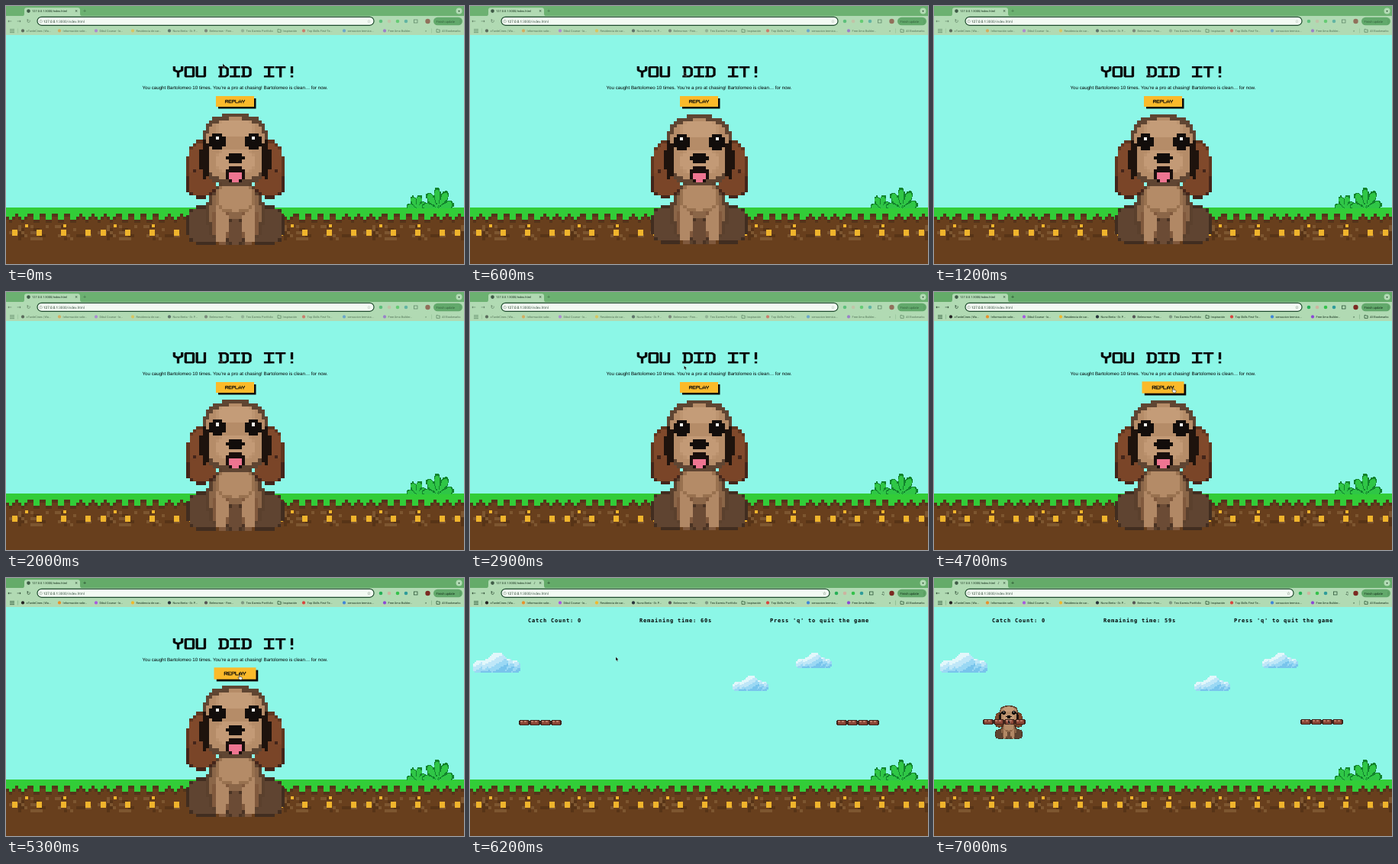
An HTML page for the animation above (7.1 s loop, 600 by 338 pixels).

```html
<!DOCTYPE html>
<html lang="en">
<head>
<meta charset="utf-8">
<title>Catch the dog</title>
<style>
  html, body { margin: 0; width: 100%; height: 100%; overflow: hidden; background: #8cf7e7; }
  svg { display: block; width: 100vw; height: 100vh; }
  text { white-space: pre; text-rendering: geometricPrecision; }
  .art { shape-rendering: crispEdges; }
  .ui { font-family: Roboto, sans-serif; fill: #16301d; }
  .sym { font-family: "DejaVu Sans", sans-serif; text-anchor: middle; }
  .hud { font: bold 7px "DejaVu Sans Mono", monospace; letter-spacing: .79px; }
  .note { font: 6.2px "Liberation Sans", Arial, sans-serif; text-anchor: middle; }
  .pen { fill: none; stroke: #0a0a0a; stroke-width: 1.3; stroke-linecap: square; stroke-linejoin: bevel; }
</style>
</head>
<body>
<svg id="stage" viewBox="0 0 600 338"></svg>
<script>
const LOOP = 7100, STEP = 100;
const FOCUS_AT = 4600, GAME_AT = 5500, TICK_AT = 6600;

// ---------- helpers ----------
const box = (x, y, w, h) => `M${x} ${y}h${w}v${h}h${-w}z`;
const path = (fill, d) => `<path fill="${fill}" d="${d}"/>`;
const rect = (x, y, w, h, fill, extra = '') =>
  `<rect x="${x}" y="${y}" width="${w}" height="${h}" fill="${fill}" ${extra}/>`;
const dot = (x, y, r, fill) => `<circle cx="${x}" cy="${y}" r="${r}" fill="${fill}"/>`;
const text = (x, y, size, s) => `<text x="${x}" y="${y}" font-size="${size}">${s}</text>`;
const sym = (x, y, size, s) => `<text class="sym" x="${x}" y="${y}" font-size="${size}">${s}</text>`;
const repeat = (n, fn) => Array.from({ length: n }, (_, i) => fn(i)).join('');

// Unit cells coloured by a rule, one path per colour.
function cells(w, h, colour) {
  const layers = {};
  for (let y = 0; y < h; y++) for (let x = 0; x < w; x++) {
    const c = colour(x + .5, y + .5);
    if (c) layers[c] = (layers[c] || '') + box(x, y, 1, 1);
  }
  return Object.entries(layers).map(([c, d]) => path(c, d)).join('');
}

// ---------- block lettering: pen strokes on a 4 x 6 grid ----------
const STROKES = {
  Y: 'M0 0V2L2 3L4 2V0M2 3V6', O: 'M0 0H4V6H0z', U: 'M0 0V6H4V0',
  D: 'M0 0H3L4 1V5L3 6H0M.6 0V6', I: 'M0 0H4M2 0V6M0 6H4', T: 'M0 0H4M2 0V6',
  R: 'M0 6V0H4V3H0M2 3L4 6', E: 'M4 0H0V6H4M0 3H3', P: 'M0 6V0H4V3H0',
  L: 'M0 0V6H4', A: 'M0 6V2L2 0L4 2V6M0 4H4', '!': 'M2 0V3.4M2 6V6'
};
function lettering(s, cx, y, pitch, height) {
  const sx = pitch / 5.8, sy = height / 7.3;
  const marks = [...s].map((c, i) =>
    `<path class="pen" d="${STROKES[c] || ''}" transform="translate(${i * 5.8 + .9} .65)"/>`);
  return `<g role="img" aria-label="${s}" transform="translate(${cx - s.length * pitch / 2} ${y}) scale(${sx} ${sy})">${marks.join('')}</g>`;
}

// ---------- dog: mirrored rounded parts on a 30 x 40 grid ----------
// offset from the axis, y, half width, half height, fill, rim
const dogParts = [
  [9.4, 34, 5.6, 6, '#5f4431', '#412d20'],
  [0, 30.5, 8.8, 9.8, '#8b6648', '#5a402d'],
  [0, 36, 3, 4.2, '#6b4b35', '#4a3324'],
  [4.4, 33.5, 2.3, 6.4, '#b18865', '#80593d'],
  [0, 25.5, 6, 4.6, '#b48b67', '#98714f'],
  [11, 17, 3.8, 8.6, '#80492b', '#60361f'],
  [10.3, 21.2, 4.6, 4.4, '#7a4528', '#43251a'],
  [0, 11, 10.5, 11, '#b58c68', '#5f4532'],
  [9.4, 14, 1.2, 6.5, '#1e130d', '#1e130d'],
  [1, 4.5, 5, 2.8, '#c49c78', '#bd9571'],
  [0, 14.5, 6.5, 4, '#c39a76', '#bb926e'],
  [5.3, 8.5, 2.6, 2.3, '#120d0b', '#120d0b'],
  [5.5, 7.5, .6, .6, '#f5f3ee', '#f5f3ee'],
  [0, 13.5, 2.6, 1.7, '#120d0b', '#120d0b'],
  [0, 18.4, 3, 2.3, '#1a0f0d', '#1a0f0d'],
  [0, 19.2, 2, 1.5, '#ee7591', '#ee7591']
];
const dog = cells(30, 40, (x, y) => {
  let colour;
  for (const [u, v, ru, rv, fill, rim] of dogParts) {
    const d = Math.abs((Math.abs(x - 15) - u) / ru) ** 2.5 + Math.abs((y - v) / rv) ** 2.5;
    if (d < 1) colour = d > .72 ? rim : fill;
  }
  return colour;
});

// ---------- scenery ----------
const puffs = [[5, 9.5, 5], [10.5, 8.5, 4.5], [26.5, 9.5, 4.5], [22, 8.5, 4.8], [16, 6.8, 6.8]];
const cloud = cells(31, 13, (x, y) => {
  const p = puffs.filter(([a, b, r]) => Math.hypot(x - a, y - b) < r).pop();
  if (!p) return;
  const lit = (y - p[1] + (x - p[0]) * .6) / p[2];
  return lit < -.55 ? '#e2f7fb' : lit < .05 ? '#bfe7f8' : lit < .6 ? '#9ad8f4' : '#78c4ec';
});

// A fan of pointed leaves.
const bush = (w, h, leaves) => cells(w, h, (x, y) => {
  const dx = (x - w / 2) / (w / 2), up = (h - y) / h;
  const lobe = Math.abs(Math.sin(Math.atan2(up, dx) * leaves / 2 + .5));
  const left = .7 + .32 * lobe - Math.hypot(dx, up);
  if (left > 0) return left < .1 || lobe < .35 ? '#12832c' : '#2fc646';
});

// One tile of grass and earth.
function soil() {
  let seed = 11;
  const rnd = n => (seed = seed * 16807 % 2147483647) % n;
  const patches = (n, fill) =>
    repeat(n, () => rect(rnd(27) * 4, 23 + rnd(5) * 4, 4 + rnd(2) * 4, 4, fill));
  const depth = i => 12 + 4 * Math.round(1.2 * Math.sin(i * 14 * Math.PI / 29));
  return rect(0, 0, 116, 74, '#683f1d') + patches(22, '#7d5630') + patches(12, '#573417') +
    repeat(29, i => rect(i * 4, 0, 4, depth(i) + 4, '#54341a') + rect(i * 4, 0, 4, depth(i), '#32cd38')) +
    repeat(4, i => rect(8 + i * 32, 29, 7, 8, '#f0b42c')) +
    repeat(2, i => rect(25 + i * 50, 22, 4, 4, '#f0b42c'));
}

const platform = repeat(4, i => `<g transform="translate(${i * 14})">` + cells(14, 7, (x, y) => {
  const d = Math.abs((x - 7) / 7) ** 4 + Math.abs((y - 3.5) / 3.5) ** 4;
  if (d < 1) return d > .35 ? '#3f231b' : y < 3 && x % 5 > 2 ? '#bd7d68' : '#8b4636';
}) + '</g>');

// ---------- browser ----------
const bookmarks = [
  ['#222', 'oTardeCines | Wa...'], ['#e8912c', 'Información sobr...'],
  ['#a55be0', 'Dibul Course - lo...'], ['#f0b92c', 'Residencia de car...'],
  ['#26323a', 'Nuno Berta - Sr. P...'], ['#555', 'Belmorrow - Finn...'],
  ['#7d9a82', 'Teo Garmiu Portfolio'], ['', 'Inspiración'],
  ['#d8443e', 'Top Skills First-Te...'], ['#3e86d8', 'sensacion termica...'],
  ['#8a49d6', 'Free Umo Builder...']
];
const folder = x => `<path fill="none" stroke="#1c4428" stroke-width=".7" d="M${x - 2} 30.4h1.6l.6.7h2v3.2h-4.2z"/>`;
const marks = bookmarks.map(([c, s], i) => {
  const x = i < 8 ? 22 + 48 * i : 390 + 53 * (i - 8);
  return (c ? dot(x, 32.4, 2.1, c) : folder(x)) + text(x + 4.6, 33.8, 3.8, s);
}).join('');
const extensions = ['#27b057', '#cdb4a0', '#35c24b', '#2f9c9a'];

const browser = `
  ${rect(0, 0, 600, 14, '#67ad6c', 'id="strip"')}
  ${rect(0, 13, 600, 25, '#b1dab3')}
  <path fill="#b1dab3" d="M21 13.2q3 0 3-3v-5q0-3 3-3h67q3 0 3 3v5q0 3 3 3z"/>
  ${dot(593.5, 6.5, 4, '#b1dab3')}
  ${rect(560, 14.7, 38, 10.6, '#62a96b', 'rx="5.3"')}
  ${rect(41, 14.3, 441, 11, '#f3faf3', 'id="omni" rx="5.5" stroke="#1d4a2c" stroke-width="1.2"')}
  <g class="ui">
    ${dot(29.5, 6.6, 2.3, '#3f5a46')}${text(34, 8, 3.95, '127.0.0.1:3000/index.html')}
    ${sym(92, 8.2, 5, '×')}${sym(593.5, 7.6, 4, '▾')}${sym(45.5, 21.3, 4, 'ⓘ')}
    ${text(49, 21.6, 4.6, '127.0.0.1:<tspan fill="#41594a">3000/index.html</tspan>')}
  </g>
  <g id="chrome" class="ui">
    ${sym(103, 8.3, 5.5, '+')}
    ${sym(5, 22, 6.5, '←')}${sym(17, 22, 6.5, '→')}${sym(29.5, 22, 6.5, '↻')}
    <g id="tools">
      ${sym(475.5, 21.8, 5.5, '☆')}
      ${extensions.map((c, i) => dot(491 + 11 * i, 20, 2.3, c)).join('')}
      ${rect(534.5, 18, 4.5, 4, 'none', 'stroke="#1c4428" stroke-width=".7"')}
    </g>
    <g id="audio">${sym(84.5, 8, 4, '♪')}${sym(541, 22, 5.5, '♫')}</g>
    ${dot(552.5, 20, 3.2, '#7c2a22')}
    ${text(563.5, 21.5, 4.1, 'Finish update')}${sym(595, 21.6, 5, '⋮')}
    ${repeat(9, i => rect(5.4 + i % 3 * 2, 30 + Math.floor(i / 3) * 2, 1.2, 1.2, '#1c4428'))}
    ${rect(15, 29.5, .5, 6, '#6fa577')}${marks}
    ${text(549, 34, 4.5, '»')}${rect(557, 29.5, .5, 6, '#6fa577')}
    ${folder(566)}${text(571, 33.8, 3.8, 'All Bookmarks')}
  </g>`;

// ---------- stage ----------
// x, y, cell size, speed in px/s
const skyline = [[4, 97.5, 2, 5.3], [344, 128, 1.5, -3.6], [427, 98, 1.5, 3.8]];
stage.innerHTML = `
  <defs>
    <g id="dogArt">${dog}</g><g id="cloudArt">${cloud}</g><g id="platformArt">${platform}</g>
    <pattern id="soil" y="264" width="116" height="74" patternUnits="userSpaceOnUse">${soil()}</pattern>
  </defs>
  ${rect(0, 38, 600, 226, '#8cf7e7')}
  <g class="art">
    ${rect(0, 264, 600, 74, 'url(#soil)')}
    <g transform="translate(525 247) scale(1.3)">${bush(20, 14, 7)}</g>
    <g transform="translate(545 238) scale(1.3)">${bush(32, 21, 9)}</g>
  </g>
  <g id="win">
    <g id="bigDog" class="art"><use href="#dogArt"/></g>
    ${lettering('YOU DID IT!', 300, 79, 14.9, 14.5)}
    <text class="note" x="300" y="109.2">You caught Bartolomeo 10 times. You’re a pro at chasing! Bartolomeo is clean… for now.</text>
    <g id="button">
      ${rect(278, 121, 49.5, 13.5, '#0a0a0a')}${rect(275, 118, 50, 14, '#fbba2a')}
      ${lettering('REPLAY', 300, 123, 4.4, 4.2)}
    </g>
  </g>
  <g id="game">
    <g class="art">${repeat(skyline.length, () => '<use class="cloud" href="#cloudArt"/>')}</g>
    <text class="hud" x="76" y="58.3">Catch Count: 0</text>
    <text class="hud" id="timer" x="222" y="58.3"></text>
    <text class="hud" x="393" y="58.3">Press 'q' to quit the game</text>
    <g id="smallDog" class="art" transform="translate(80 167) scale(1.2 1.1)"><use href="#dogArt"/></g>
    <g id="platforms" class="art"><use href="#platformArt" x="64"/><use href="#platformArt" x="480"/></g>
  </g>
  ${browser}
  <g id="pointer">
    <path id="arrow" fill="#050505" stroke="#fff" stroke-opacity=".6" stroke-width=".35" d="M0 0v4.800l1.100-1 .8 1.900.9-.4-.8-1.800h1.500z"/>
    <path id="hand" fill="#fff" stroke="#111" stroke-width=".5" d="M-.6.400q.6-.8 1.200 0v2l2.400.6q.7.300.5 1.200l-.5 2h-3l-2-2.600q.2-.8.900-.3l.5.400z"/>
  </g>`;

const $ = id => document.getElementById(id);
const show = (id, on) => { $(id).style.display = on ? '' : 'none'; };
const move = (el, v) => el.setAttribute('transform', v);
const clouds = [...document.querySelectorAll('.cloud')];

// time, x, y of the pointer tip
const track = [
  [0, 284, 75.5], [600, 281, 87], [2500, 281, 87], [2800, 280.5, 96.5], [3400, 280.5, 96.5],
  [4000, 315, 125.5], [4600, 315, 125.5], [5000, 306, 127], [5500, 306, 127],
  [6200, 191, 103.5], [6800, 97, 186], [LOOP, 97, 186]
];
function pointerAt(t) {
  const i = track.findIndex(k => k[0] > t);
  const [t0, x0, y0] = track[i - 1], [t1, x1, y1] = track[i];
  const p = (t - t0) / (t1 - t0), e = p * p * (3 - 2 * p);
  return [x0 + (x1 - x0) * e, y0 + (y1 - y0) * e];
}

function draw(t) {
  const active = t >= FOCUS_AT, game = t >= GAME_AT, hover = active && !game;
  show('win', !game);
  show('game', game);
  show('audio', game);
  show('smallDog', t >= TICK_AT);
  show('arrow', !hover);
  show('hand', hover);

  $('chrome').setAttribute('opacity', active ? 1 : .6);
  $('strip').setAttribute('fill', active ? '#64ab69' : '#6cb171');
  $('omni').setAttribute('width', game ? 430 : 441);
  move($('tools'), `translate(${game ? -11 : 0})`);
  move($('pointer'), `translate(${pointerAt(t)})`);
  move($('button'), `translate(300 125) scale(${hover ? 1.1 : 1}) translate(-300 -125)`);

  const breath = 4.26 * (1 + .009 * Math.cos((t + 100) / 1800 * 2 * Math.PI));
  move($('bigDog'), `translate(300.5 227) scale(${breath}) translate(-15 -20)`);

  const s = (t - 6200) / 1000;
  clouds.forEach((el, i) => {
    const [x, y, size, speed] = skyline[i];
    move(el, `translate(${x + speed * s} ${y}) scale(${size})`);
  });
  move($('platforms'), `translate(0 ${186 - Math.sin(s)})`);
  $('timer').textContent = `Remaining time: ${t < TICK_AT ? 60 : 59}s`;
}

const start = performance.now();
function tick() {
  const t = (performance.now() - start) % LOOP;
  draw(Math.floor(t / STEP) * STEP);
  requestAnimationFrame(tick);
}
tick();
</script>
</body>
</html>
```
